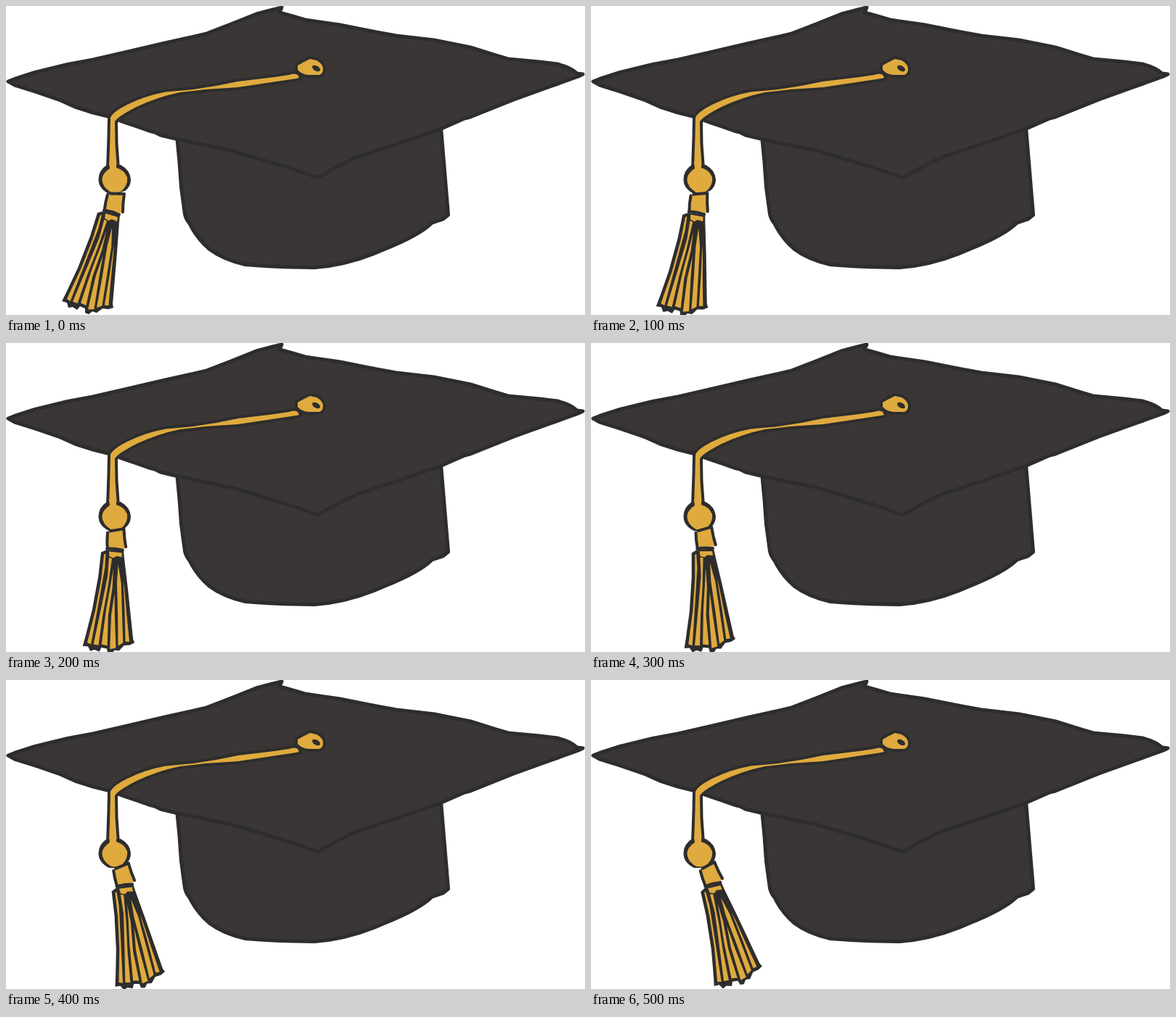
Recreate the animation shown at these times as an HTML page. Size 798 by 426 pixels, loop 0.6 s.

```html
<!DOCTYPE html>
<html lang="en">
<head>
<meta charset="utf-8">
<title>Graduation cap</title>
<style>
  html, body { margin: 0; width: 100%; height: 100%; overflow: hidden; background: #fff; }
  svg { display: block; width: 100%; height: 100%; }
  path { stroke-linejoin: round; stroke-linecap: round; }
  .cloth { fill: #3a3635; stroke: #2e2d2d; stroke-width: 5; }
  .ink { fill: #2e2d2d; }
  .line { fill: none; stroke: #2e2d2d; stroke-width: 4; }
  .gold { fill: #dfaa3e; }
  .edged { fill: #dfaa3e; stroke: #2e2d2d; stroke-width: 8; paint-order: stroke; }
  .strand { fill: #dfaa3e; stroke: #2e2d2d; stroke-width: 1.5; }
</style>
</head>
<body>
<svg viewBox="0 0 798 426">
  <!-- skull cap -->
  <path class="cloth" d="M236 184L239 215L241.500 250L246.500 287Q248 294 253 300Q263 320 280 335Q300 350 330 356.500
    Q370 360 425 360.500Q472 357 520 336Q570 316 587 299L602 294L609.500 288L599.500 168Z"/>
  <!-- board -->
  <path class="cloth" d="M3 104L12 100.500L40 91.500L85 80.500L120 74L170 62.500L217 51.500L275 38.500L310 25L345 11L368 5L380 2L377 9
    L395 14L412 19L425 21L460 26L500 34L538 41L590 47L640 57L675 68L692 73L735 77L760 80Q779 85 787 93
    L795 94L789 97L750 111L700 129L665 143L640 153L632 155L598 170L540 190L485 208Q458 220 430 237
    L390 223L350 211L310 199L275 192L238 184L213 178L205 174L197 172L180 166L165 161L140 152
    L120 147L95 139L75 130L40 118L12 109Z"/>
  <!-- cord, button and bead -->
  <path class="edged" d="M404 99L402 95Q398 92 390 95L370 98L320 104L290 110L258 115L220 118.500Q191 124 167 136
    Q147 146 144 154L143.500 180L142 225H153L150.500 190L150 160Q151 154 180 139Q210 125 240 119L275 115L320 112L360 106L400 100Z"/>
  <path class="edged" d="M402 82L409 78L419 73L428 75Q437 80 437 87Q437 93 432 95L418 95Q408 95 402 88Z"/>
  <ellipse class="ink" cx="427.500" cy="86" rx="6" ry="3.500" transform="rotate(30 427.500 86)"/>
  <path class="ink" d="M139 219Q127 227 127.500 240Q128 252 142 259L150 259L164 255Q172 249 172 239Q171 226 158 219Z"/>
  <path class="gold" d="M143 224Q132 231 132.500 240Q133 250 145 257Q158 259 163 251Q168 244 167 236Q163 226 152 223L152 215L142 215Z"/>

  <g id="tassel">
    <path class="gold" d="M141 259L163 259L160 286L136 280Z"/>
    <path class="line" d="M140 260Q137 270 136 279M144 258.500L163 259Q161 272 161 284"/>
    <!-- fringe -->
    <path class="ink" d="M126 285L134 283L157 288L156 298L153 340L147 411L148 416L141 418L133 417L125 423L119 421L114 425
      L109 423L109 417L102 414L98 419L92 415L86 416L84 409L77 407L83 395L99 361L116 317Z"/>
    <path class="gold" d="M137 286L154 291L153 297L146 294L141 296L136 294Z"/>
    <path class="strand" d="M129 288L133 287L128 307L110 354L89 408L83 404L103 361L119 320Z"/>
    <path class="strand" d="M135 293L140 296L127 334L113 370L99 411L91 408L112 358L128 319Z"/>
    <path class="strand" d="M142 298L133 336L120 373L111 414L102 410L118 362L130 331Z"/>
    <path class="strand" d="M136 335L129 374L122 419L112 419L123 372Z"/>
    <path class="strand" d="M147 299L146 332L140 370L133 414L124 417L132 373L139 330Z"/>
    <path class="strand" d="M151 299L149 340L145 380L142 414L135 413L142 371L148 330Z"/>
    <path class="line" d="M135 281.500Q146 283 156 287.500"/>
  </g>
</svg>
<script>
  const tassel = document.getElementById('tassel');
  const STEP = 100;
  // swing angle, then drift of the knot
  const poses = [
    [0, 0, 0], [5.8, 0, 0.5], [10.8, 4.5, -0.5],
    [17.5, 11.5, -2], [24, 17.5, -2.5], [30, 22, -4]
  ];

  function draw(now) {
    const [angle, x, y] = poses[Math.floor(now / STEP) % poses.length];
    tassel.setAttribute('transform', `translate(${x} ${y}) rotate(${-angle} 148 284.5)`);
    requestAnimationFrame(draw);
  }
  draw(performance.now());
</script>
</body>
</html>
```
